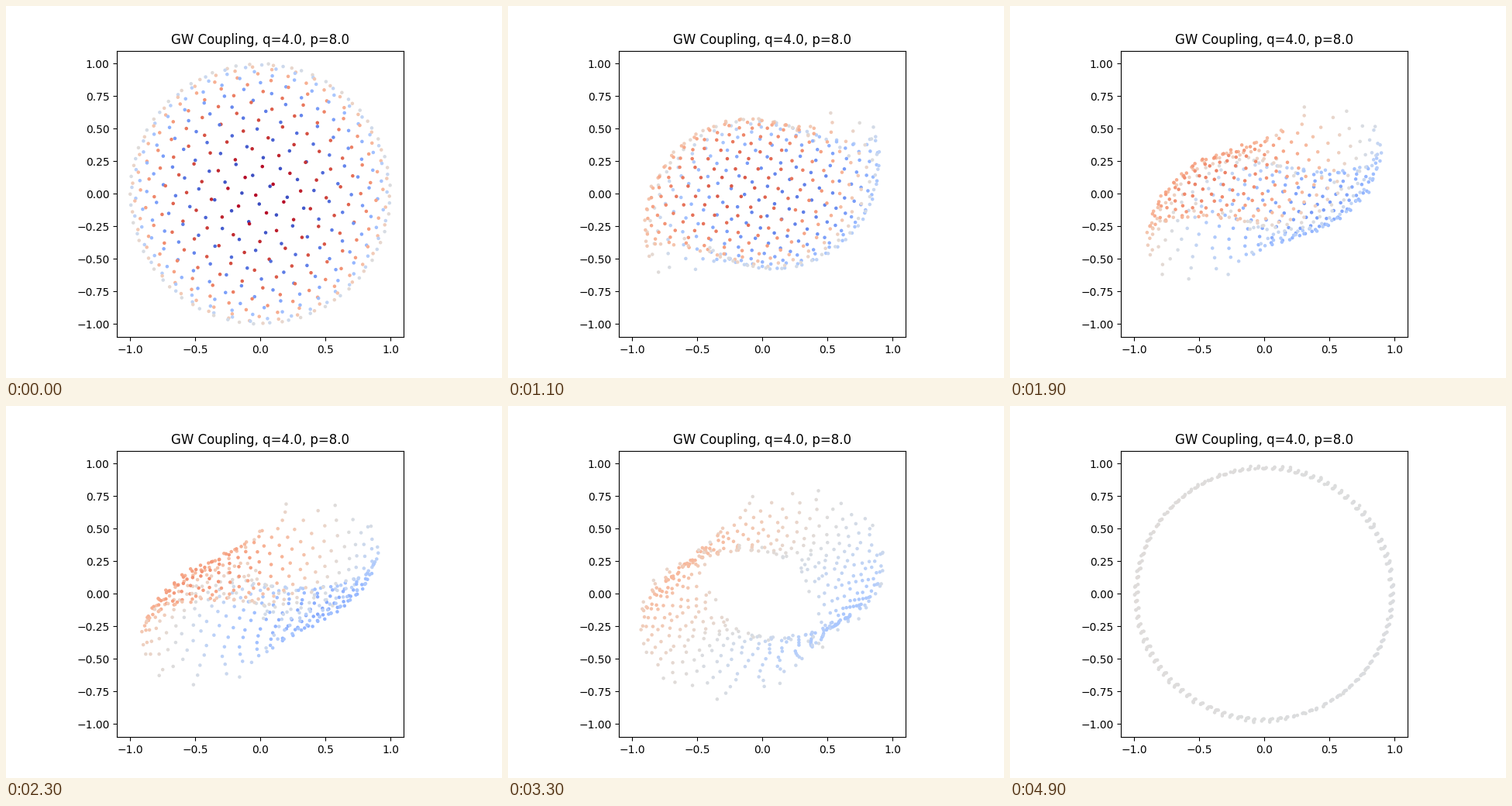
Recreate the animation shown at these times as a matplotlib script. Size 640 px wide and 480 px high, loop 5 s.

```python
import numpy as np
import matplotlib.pyplot as plt
from matplotlib.animation import FuncAnimation

FRAMES, INTERVAL = 50, 100
SPHERE_POINTS, CIRCLE_POINTS = 500, 100
AXIS_ANGLE = np.radians(38)     # direction collapsed by the coupling
POLE_ANGLE = np.radians(164)    # circle angle that receives the north pole


def fibonacci_sphere(count):
    i = np.arange(count)
    y = 1 - (2 * i + 1) / count
    radius = np.sqrt(1 - y ** 2)
    angle = i * np.pi * (3 - np.sqrt(5))
    return np.column_stack([radius * np.cos(angle), y, radius * np.sin(angle)])


def couple_to_circle(points):
    """Send equal shares of the sphere to evenly spaced points of the circle."""
    x, y, z = points.T
    across = -np.sin(AXIS_ANGLE) * x + np.cos(AXIS_ANGLE) * y
    angle = (POLE_ANGLE + np.arctan2(across, z)) % (2 * np.pi)
    rank = np.argsort(np.argsort(angle))
    share = len(points) // CIRCLE_POINTS
    slot = (rank + share // 2) // share
    snapped = 2 * np.pi * slot / CIRCLE_POINTS
    return np.column_stack([np.cos(snapped), np.sin(snapped), 0 * snapped])


start = fibonacci_sphere(SPHERE_POINTS)
end = couple_to_circle(start)

plt.rcParams["font.family"] = "DejaVu Sans"
fig, ax = plt.subplots(figsize=(6.4, 4.8), dpi=100)
ax.set_aspect("equal")
ax.set_xlim(-1.1, 1.1)
ax.set_ylim(-1.1, 1.1)
ax.set_title("GW Coupling, q=4.0, p=8.0")
dots = ax.scatter(start[:, 0], start[:, 1], c=start[:, 2], s=5,
                  cmap="coolwarm", vmin=-1, vmax=1)


def update(frame):
    t = frame / FRAMES
    points = (1 - t) * start + t * end
    dots.set_offsets(points[:, :2])
    dots.set_array(points[:, 2])
    return dots,


animation = FuncAnimation(fig, update, frames=FRAMES, interval=INTERVAL,
                          repeat=True, repeat_delay=0)
plt.show()
```
